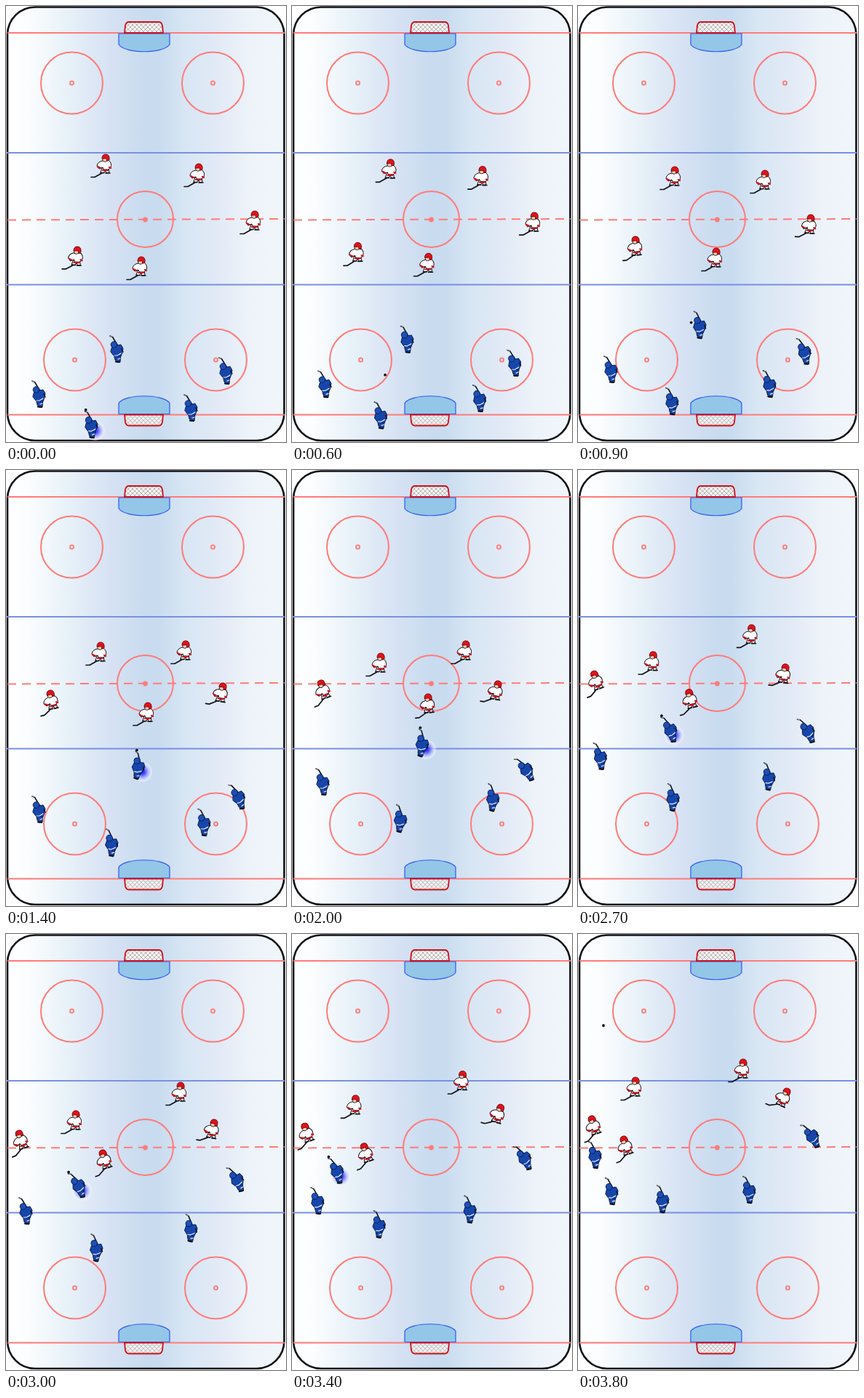
An HTML page with a canvas that plays this animation: 385 px wide and 600 px high, repeating every 3.9 s.

```html
<!DOCTYPE html>
<html lang="en">
<head>
<meta charset="utf-8">
<title>Hockey breakout</title>
<style>
  html, body { margin: 0; width: 100%; height: 100%; overflow: hidden; background: #fff; }
  canvas { display: block; }
</style>
</head>
<body>
<canvas id="rink" width="385" height="600"></canvas>
<script>
const ctx = document.getElementById('rink').getContext('2d');
const LOOP = 3900, HOLD = 500, STEP = 100;
const PINK = '#ff7b79', RED = '#d01018', BLUE = '#1746ab', INK = '#101018';

// Each route lists x, y and tilt in degrees at these steps.
const KEYS = [0, 5, 10, 16, 20, 26, 34];
const whiteRoutes = [
  [137,209,0, 133,226,0, 130,242,0, 122,257,0, 111,257,0, 96,248,0, 79,202,0],
  [265,222,0, 257,231,0, 247,240,0, 239,240,0, 236,226,0, 240,209,0, 227,177,0],
  [342,287,0, 320,292,3, 298,298,8, 283,295,9, 284,282,6, 286,260,9, 287,217,23],
  [98,336,2, 79,322,-6, 61,308,-14, 40,294,-22, 29,287,-20, 18,275,-21, 19,255,-20],
  [186,350,0, 190,338,0, 195,325,0, 187,313,-6, 169,310,-11, 133,302,-20, 63,283,-20]
];
const blueRoutes = [
  [45,534,0, 45,500,0, 45,467,0, 42,429,0, 37,408,0, 27,381,0, 46,354,2],
  [117,576,2, 129,544,3, 145,513,6, 149,480,12, 138,466,9, 124,432,7, 116,365,6],
  [152,472,0, 167,439,5, 182,407,16, 179,376,15, 152,366,-1, 99,345,-15, 23,304,2],
  [254,553,0, 263,520,2, 272,485,4, 276,451,10, 270,437,9, 254,405,8, 235,352,3],
  [302,502,0, 311,475,-5, 319,449,-13, 321,411,-23, 315,379,-19, 317,337,-16, 321,277,-21]
];
const PASSER = blueRoutes[1], CARRIER = blueRoutes[2];
const CATCH = 6, SHOT = 30, LAST = 34;

// Smooth curve through unevenly timed points.
function along(route, step) {
  const end = KEYS.length - 1;
  let i = 0;
  while (i < end - 1 && step > KEYS[i + 1]) i++;
  const span = KEYS[i + 1] - KEYS[i], u = (step - KEYS[i]) / span;
  return [0, 1, 2].map(axis => {
    const value = k => route[k * 3 + axis];
    const slope = k => {
      const a = Math.max(k - 1, 0), b = Math.min(k + 1, end);
      return (value(b) - value(a)) / (KEYS[b] - KEYS[a]) * span;
    };
    const p = value(i), q = value(i + 1), m = slope(i), n = slope(i + 1);
    return p + u * (m + u * (3 * (q - p) - 2 * m - n + u * (2 * (p - q) + m + n)));
  });
}

function shape(d, fill, stroke, width = 1) {
  const path = new Path2D(d);
  if (fill) { ctx.fillStyle = fill; ctx.fill(path); }
  if (stroke) { ctx.strokeStyle = stroke; ctx.lineWidth = width; ctx.stroke(path); }
}

function circle(x, y, r, fill, stroke, width = 1) {
  ctx.beginPath();
  ctx.arc(x, y, r, 0, 7);
  if (fill) { ctx.fillStyle = fill; ctx.fill(); }
  if (stroke) { ctx.strokeStyle = stroke; ctx.lineWidth = width; ctx.stroke(); }
}

function placed(x, y, tilt, draw) {
  ctx.save();
  ctx.translate(x, y);
  ctx.rotate(tilt * Math.PI / 180);
  draw();
  ctx.restore();
}

function goal(y, flip) {
  ctx.save();
  ctx.translate(0, y);
  ctx.scale(1, flip);
  shape('M155 1V16C164 29 216 29 225 16V1Z', '#94c6e8', '#3158ef', 1.2);
  const frame = 'M163 0L164 -10Q165 -15 169 -15H210Q214 -15 215 -10L216 0Z';
  shape(frame, '#f4f2f2');
  ctx.save();
  ctx.clip(new Path2D(frame));
  for (let x = 145; x < 235; x += 6) shape(`M${x} 0l16 -16M${x} -16l16 16`, null, '#b9b5b8', 1);
  ctx.restore();
  shape(frame, null, RED, 1.8);
  ctx.restore();
}

function rink() {
  const ice = ctx.createLinearGradient(0, 0, 385, 0);
  [[0, '#fff'], [.08, '#fbfdfe'], [.2, '#eaf3f9'], [.36, '#d8e3f4'], [.5, '#c8dbef'], [.55, '#c9dcef'],
   [.64, '#d8e6f4'], [.76, '#e2eaf6'], [.87, '#edf3f9'], [1, '#f1f6fa']].forEach(s => ice.addColorStop(...s));
  ctx.fillStyle = '#fff';
  ctx.fillRect(0, 0, 385, 600);
  const boards = new Path2D();
  boards.roundRect(2, 1.5, 380.5, 596.5, 38);
  ctx.fillStyle = ice;
  ctx.fill(boards);
  ctx.strokeStyle = INK;
  ctx.lineWidth = 2.6;
  ctx.stroke(boards);

  shape('M2 37H383M2 562.5H383', null, PINK, 2);
  shape('M1 202H383M1 383.5H383', null, '#7990e4', 2.2);
  ctx.setLineDash([12, 8]);
  shape('M2 294.5L383 293', null, PINK, 2);
  ctx.setLineDash([]);
  [[90.5, 106], [284.5, 106], [94.5, 487], [288.5, 487]].forEach(([x, y]) => {
    circle(x, y, 42.5, null, PINK, 2);
    circle(x, y, 2.6, null, PINK, 1.8);
  });
  circle(191.5, 293.5, 38.5, null, PINK, 2);
  circle(191.5, 294, 3.4, PINK);
  goal(37, 1);
  goal(562.5, -1);
}

function whitePlayer() {
  shape('M-20 26.5L-15 26.5L-7 22L6 13', null, INK, 1.7);
  shape('M-5 14L-7 20L-3 21L0 17L1 21L5 20L4 14Z', '#fff', INK, 1);
  shape('M-7 20.5H-2M0 21H6', null, INK, 1.6);
  shape('M-4 4Q-11 5 -12 11L-9 15L-4 13L-3 16L4 16L7 13Q9 8 5 4Z', '#fff', INK, 1);
  shape('M-11 12L-7 14M-4 17H3M5 13L7 14', null, RED, 2.2);
  circle(-1, 2, 3.4, '#f4c9b4', INK, .8);
  shape('M-5 1Q-5 -5 0 -5Q6 -5 5 3L2 4L1 1Z', '#e2131b', '#70080c', .9);
}

function bluePlayer() {
  shape('M-9 -18L-5.5 -16.5L2 -4', null, INK, 1.6);
  shape('M-8.5 -18L-6 -17', null, '#ddd', .7);
  shape('M-4 7L-2 15L0 18L5 18L6 8Z', BLUE, INK, .9);
  shape('M-1 17.5L4 18', null, INK, 2.2);
  shape('M-7 -1Q-6 -6 1 -5L6 -6L9 -1L8 5L6 10L-4 9L-8 4Z', BLUE, '#0b1f5c', 1);
  shape('M-3 9L1 9L6 6M2 14L5 13', null, '#eef2ff', 1.2);
  shape('M7 0L9 4', null, INK, 1.4);
  circle(-3.5, -6, 4.3, '#1d4fb5', '#0b1f5c', 1);
}

function glow(x, y) {
  const light = ctx.createRadialGradient(x, y, 0, x, y, 14);
  [[0, '#1212ff'], [.3, 'rgba(70,70,255,.85)'], [.65, 'rgba(185,190,255,.7)'],
   [.88, 'rgba(240,242,255,.65)'], [1, 'rgba(255,255,255,0)']].forEach(s => light.addColorStop(...s));
  circle(x, y, 14, light);
}

function bladeOf(route, step) {
  const [x, y, tilt] = along(route, step), a = tilt * Math.PI / 180;
  return [x - 8 * Math.cos(a) + 20 * Math.sin(a), y - 8 * Math.sin(a) - 20 * Math.cos(a)];
}

function puckAt(step) {
  const slide = (from, to, u) => from.map((v, i) => v + (to[i] - v) * u);
  if (step < CATCH) return slide(bladeOf(PASSER, 0), bladeOf(CARRIER, CATCH), step / CATCH);
  if (step <= SHOT) return bladeOf(CARRIER, step);
  return slide(bladeOf(CARRIER, SHOT), [35, 126], (step - SHOT) / (LAST - SHOT));
}

function draw(now) {
  const time = now % LOOP;
  const step = time < HOLD ? 0 : Math.floor((time - HOLD) / STEP) + 1;
  rink();
  const holder = step === 0 ? PASSER : step >= CATCH && step <= SHOT ? CARRIER : null;
  if (holder) {
    const [x, y] = along(holder, step);
    glow(x + 5.5, y + 8.5);
  }
  ctx.lineJoin = ctx.lineCap = 'round';
  whiteRoutes.forEach(route => placed(...along(route, step), whitePlayer));
  blueRoutes.forEach(route => placed(...along(route, step), bluePlayer));
  ctx.lineJoin = 'miter';
  ctx.lineCap = 'butt';
  circle(...puckAt(step), 1.9, INK);
  requestAnimationFrame(() => draw(performance.now() - start));
}

const start = performance.now();
draw(0);
</script>
</body>
</html>
```
